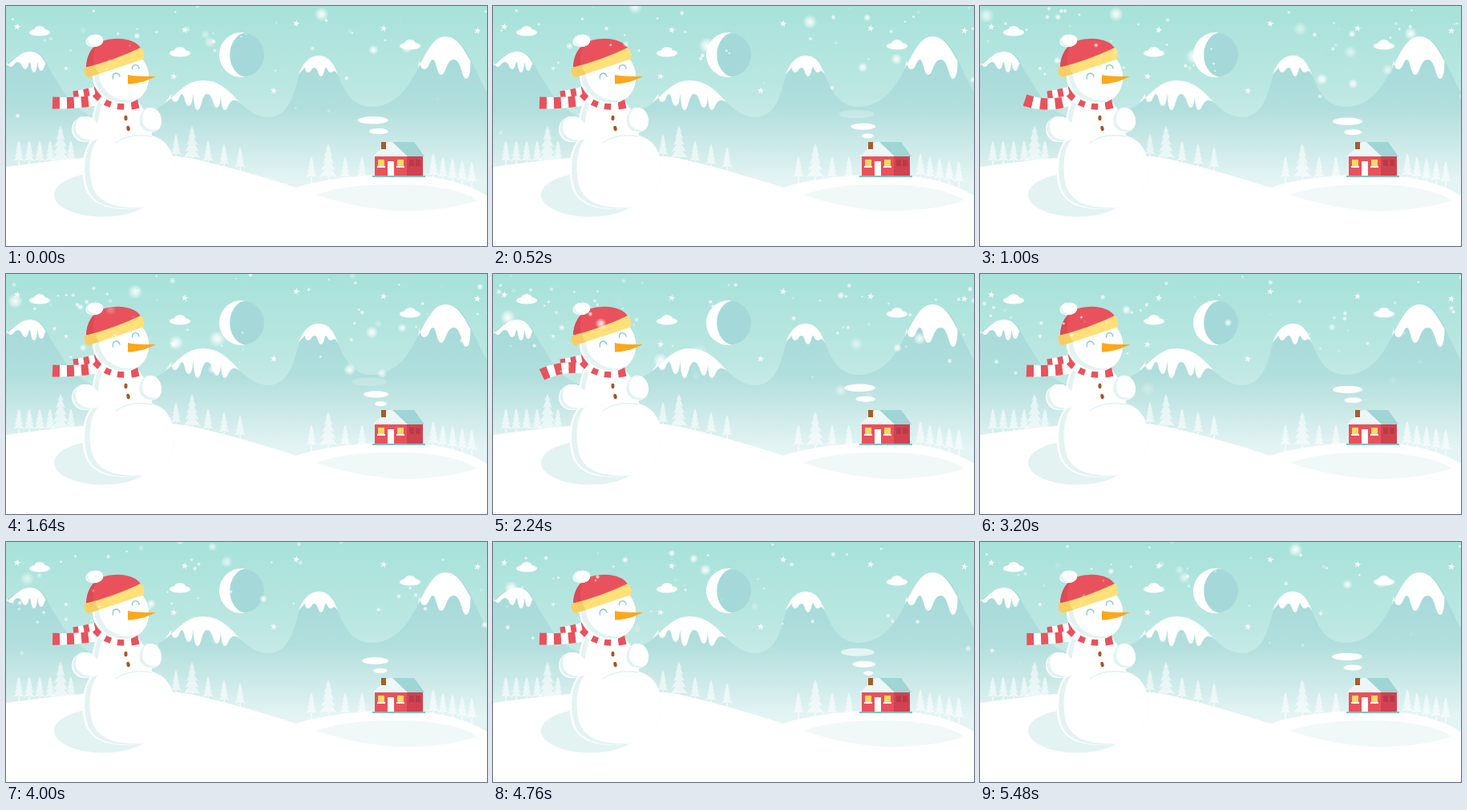
Recreate the animation shown at these times as an HTML page with a canvas. Size 600 by 300 pixels, loop 5520 ms.

```html
<!DOCTYPE html>
<html lang="en">
<head>
<meta charset="utf-8">
<title>Snowman in the hills</title>
<style>
  html, body { margin: 0; width: 100%; height: 100%; overflow: hidden; background: #fff; }
  canvas { display: block; }
</style>
</head>
<body>
<canvas id="stage" width="600" height="300"></canvas>
<script>
const c = document.getElementById('stage').getContext('2d');
const LOOP = 5520, STEP = 40, TAU = Math.PI * 2;
const RED = '#e9525c', SHADE = '#e2f3f2', MOON = '#a5d9d9';

let seed = 41;
const rnd = () => (seed = seed * 16807 % 2147483647) / 2147483647;

function fill(color, d) {
  c.fillStyle = color;
  c.fill(new Path2D(d));
}

function line(color, width, d) {
  c.strokeStyle = color;
  c.lineWidth = width;
  c.lineCap = 'round';
  c.stroke(new Path2D(d));
}

function oval(color, x, y, rx, ry = rx, turn = 0) {
  c.fillStyle = color;
  c.beginPath();
  c.ellipse(x, y, rx, ry, turn, 0, TAU);
  c.fill();
}

function rect(color, x, y, w, h) {
  c.fillStyle = color;
  c.fillRect(x, y, w, h);
}

function fade(y0, y1, ...colors) {
  const g = c.createLinearGradient(0, y0, 0, y1);
  colors.forEach((color, i) => g.addColorStop(i / (colors.length - 1), color));
  return g;
}

// White shape with a shaded stripe just inside its edge
function snow(d, dx, dy) {
  fill('#fff', d);
  c.save();
  c.clip(new Path2D(d));
  c.translate(dx * .3, dy * .3);
  fill(SHADE, d);
  c.translate(dx * .7, dy * .7);
  fill('#fff', d);
  c.restore();
}

function star(x, y, r = 4.5) {
  c.fillStyle = 'rgba(255,255,255,.85)';
  c.beginPath();
  for (let i = 0; i < 10; i++) {
    const a = i * Math.PI / 5 - 1.4, q = i % 2 ? r * .42 : r;
    c.lineTo(x + q * Math.cos(a), y + q * Math.sin(a));
  }
  c.fill();
}

function tree(x, base, h) {
  c.beginPath();
  for (const side of [1, -1]) {
    c.moveTo(x, base - h);
    for (let i = 1; i <= 5; i++) {
      const y = base - h + h * i / 5, w = h * (.04 + .045 * i);
      c.lineTo(x + side * w, y);
      c.lineTo(x + side * w * .45, y - 1.5);
    }
    c.lineTo(x, base);
  }
  c.rect(x - 1, base - 2, 2, 12);
  c.fill();
}

// Evenly spaced trees; number 0 is the tall one
function grove(x, base, gap, first, last, slope = 0, tall = 40) {
  c.fillStyle = 'rgba(255,255,255,.58)';
  for (let i = first; i <= last; i++) tree(x + i * gap, base + i * slope, i ? 26 : tall);
}

function cloud(x, y) {
  oval('#fff', x, y + 1, 13, 4.6);
  oval('#fff', x, y - 1.5, 7, 5.5);
}

// Snow cap: ridge line closed from right to left by rounded drips
function cap(ridge, top, w, ...tips) {
  const drips = tips.map(([x, y], i) => {
    const mid = i + 1 < tips.length ? (x + tips[i + 1][0]) / 2 : x - w;
    return `C${x + w} ${top} ${x + w} ${y} ${x} ${y}C${x - w} ${y} ${x - w} ${top} ${mid} ${top}`;
  });
  fill('#fff', ridge + drips.join('') + 'Z');
}

// Striped band along a quadratic curve
function ribbon(p0, p1, p2, w0, w1, n) {
  const edge = (u, side) => {
    const v = 1 - u, at = k => v * v * p0[k] + 2 * u * v * p1[k] + u * u * p2[k];
    const slope = k => v * (p1[k] - p0[k]) + u * (p2[k] - p1[k]);
    const dx = slope(0), dy = slope(1), w = side * (w0 + (w1 - w0) * u) / 2 / Math.hypot(dx, dy);
    return [at(0) - dy * w, at(1) + dx * w];
  };
  for (let i = 0; i < n; i++) {
    const a = i / n, b = (i + 1) / n;
    c.fillStyle = i % 2 ? '#fff' : RED;
    c.beginPath();
    for (const u of [a, (a + b) / 2, b]) c.lineTo(...edge(u, -1));
    for (const u of [b, (a + b) / 2, a]) c.lineTo(...edge(u, 1));
    c.fill();
  }
}

function landscape() {
  rect(fade(0, 220, '#a7e2da', '#bde7e3', '#dff3f2'), 0, 0, 600, 300);

  oval(MOON, 294.5, 61, 27.5);
  fill('#fff', 'M298 33.3A28 28 0 1 0 298 88.7A22 28 0 0 1 298 33.3Z');

  fill(fade(40, 218, '#a0d8d7', '#b2dfdd', '#e4f4f4'),
    `M0 72C12 66 18 57 30 57C50 57 50 75 60 88C72 105 84 140 130 142C165 142 180 134 198 122
     C215 108 225 93 245 93C268 93 280 108 292 121C305 133 315 139 328 139
     C355 138 360 105 366 85C372 68 380 62 390 62C402 62 408 72 415 88
     C424 112 435 125 455 126C490 126 505 95 515 76C527 52 535 38 548 38
     C565 38 573 54 580 68C588 84 594 97 600 108V240H0Z`);

  cap('M0 75C12 66 18 57 30 57C42 57 46 66 50 73', 70, 4, [44, 81], [35, 83], [24, 79], [6, 76]);
  cap('M198 122C215 108 225 93 245 93C268 93 280 108 292 121', 110, 5, [273, 130], [263, 127], [239, 130], [228, 125], [211, 120]);
  cap('M365 85C372 68 380 62 390 62C402 62 408 70 415 88', 77, 4, [405, 83], [393, 88], [377, 83]);
  cap('M514 78C527 52 535 38 548 38C564 38 572 56 579 68', 67, 6, [574, 91], [543, 86], [522, 79]);

  for (const p of [[14, 26], [223, 30], [209, 88], [334, 106], [362, 22], [471, 28], [588, 31], [75, 78, 3]]) star(...p);
  cloud(42, 32);
  cloud(217, 58);
  cloud(504, 49);

  grove(68, 194, 13, -4, 1, 0, 44);
  grove(232, 190, 20, -1, 3, 4);
  grove(402, 214, 21, -1, 2, 0, 42);
  grove(533, 212, 12, 0, 4, 2, 28);

  fill('#fff', 'M0 201C60 193 190 175 250 195C290 204 330 217 362 227C400 215 440 211 490 211C540 211 575 222 600 237V300H0Z');
  fill('#f1f8f8', 'M386 236C420 225 450 223 490 223C530 223 570 230 588 243C560 253 520 257 490 256C450 254 415 245 386 236Z');
}

function smoke(t) {
  const phase = (.64 + t / 1104) % 1;
  for (let u = phase - 1; u < 2.2; u++) {
    if (u < -.12) continue;
    const rx = 6.5 + 9 * u - .8 * u * u;
    c.globalAlpha = Math.min(1, (u + .12) * 14, (2.2 - u) * 2.6);
    oval('#fff', 468 - 4.2 * u - 1.3 * u * u, 163.5 - 9.5 * u - 1.9 * u * u, rx, 1.7 + .16 * rx);
  }
  c.globalAlpha = 1;
}

function house() {
  rect(RED, 460, 187, 40, 25);
  rect('#d14250', 500, 187, 20, 25);
  fill('#9fd5d4', 'M477 170H509L522 188H498Z');
  fill('#ecf7f7', 'M457 188L477 170H482L501 188Z');
  rect('#a65d29', 468, 170, 6, 9);
  for (const x of [464, 488]) {
    rect('#ffd760', x, 192, 8, 8);
    rect('#fff', x - 1, 200, 10, 2);
  }
  rect('#fff', 476, 194, 8, 18);
  for (const x of [503, 511]) rect('#b83a48', x, 192, 6, 8);
  rect('#86bdc5', 457, 212, 66, 2);
}

// The tail rests, then flicks once and settles
function scarf(t) {
  const q = Math.max(0, t / 1380 % 1 - .46) / .54;
  const flick = Math.sin(2.5 * Math.PI * q) * (1 - q);
  ribbon([84, 111], [100, 109], [118, 105], 9, 11, 5);
  ribbon([58 + 6 * flick, 121 + 10 * flick], [85, 122 - 16 * flick], [112, 118], 15, 13, 6);
}

function snowman(t) {
  oval(SHADE, 121, 236, 61, 27.5);
  scarf(t);
  snow('M115 116C107 130 106 150 104 172H182C184 150 176 135 165 120Z', 8, 0);
  snow('M110 164C95 175 93 205 98 225C103 245 122 254 152 254C188 254 212 235 210 200C209 182 199 165 180 162C160 158 145 168 110 164Z', 9, -2);
  line(SHADE, 1.5, 'M137 171C148 163 164 160 181 163');
  snow('M98 138C108 137 115 145 115 154C115 164 107 171 98 170C88 170 82 162 82 154C82 145 89 138 98 138Z', 5, -3);
  snow('M180 127C189 127 194 136 194 144C194 153 187 159 179 158C170 158 164 151 165 143C166 134 172 127 180 127Z', 5, -3);
  oval('#fff', 108, 156, 12);

  ribbon([165, 121], [132, 128], [113, 108], 14, 14, 7);
  oval('#a5551f', 149.5, 140, 2, 3.3);
  oval('#a5551f', 152.5, 153, 2.1, 3.3, -.2);

  snow('M178 89C178 109 164 122 145 122C125 122 108 107 108 88C108 68 125 55 145 55C164 55 178 70 178 89Z', 8, -4);
  line('#83cdca', 1.4, 'M133.5 91C132 84 140 81 142 88');
  line('#83cdca', 1.4, 'M157.5 79C157 72 165 72 166 78');
  fill('#fba81c', 'M152 86C161 88 173 88 187 88C178 93 166 97 152 97.5Z');

  fill(RED, 'M100 79C100 56 114 41 136 41C151 40 164 45 169 54L135 72L103 82Z');
  fill('#dc4a55', 'M100 79C100 64 105 54 113 48C107 60 109 70 111 79Z');
  fill('#ffe079', 'M98 77C120 72 147 62 168 52C172 55 173 62 172 66C150 74 127 81 103 89C98 88 97 82 98 77Z');
  fill('#f5cf65', 'M98 77C104 76 108 75 112 73.5C111 79 114 83 117 84.5C112 86 107 88 103 89C98 88 97 82 98 77Z');
  snow('M110 36C117 35 122 39 121 44C120 49 114 52 108 51C102 51 98 47 100 42C102 38 105 36 110 36Z', 3, -2);
}

// Soft flakes, most of them small and high up, a few large and glowing
const flakes = Array.from({ length: 150 }, () => ({
  start: rnd() * LOOP, life: 1400 + rnd() * 1700,
  x: rnd() * 610 - 5, y: rnd() * rnd() * 120 - 12,
  vx: rnd() * 24 - 12, vy: 12 + rnd() * 34,
  r: 1.5 + 2 * rnd() + 8 * rnd() ** 12, sway: rnd() * TAU
}));

function glow(x, y, r) {
  const g = c.createRadialGradient(x, y, 0, x, y, r);
  g.addColorStop(0, '#fff');
  g.addColorStop(.4, 'rgba(255,255,255,.7)');
  g.addColorStop(1, 'rgba(255,255,255,0)');
  oval(g, x, y, r);
}

function snowfall(t) {
  for (const f of flakes) {
    const age = (t - f.start + LOOP) % LOOP, u = age / f.life, s = age / 1000;
    if (u > 1) continue;
    c.globalAlpha = .9 * Math.min(1, u * 6, (1 - u) * 3);
    glow(f.x + f.vx * s + 3 * Math.sin(f.sway + s * 2), f.y + f.vy * s, f.r);
  }
  c.globalAlpha = 1;
}

function draw(now) {
  const t = Math.floor(now % LOOP / STEP) * STEP;
  landscape();
  smoke(t);
  house();
  snowman(t);
  snowfall(t);
}

const begin = performance.now();
function frame() {
  draw(performance.now() - begin);
  requestAnimationFrame(frame);
}
frame();
</script>
</body>
</html>
```
